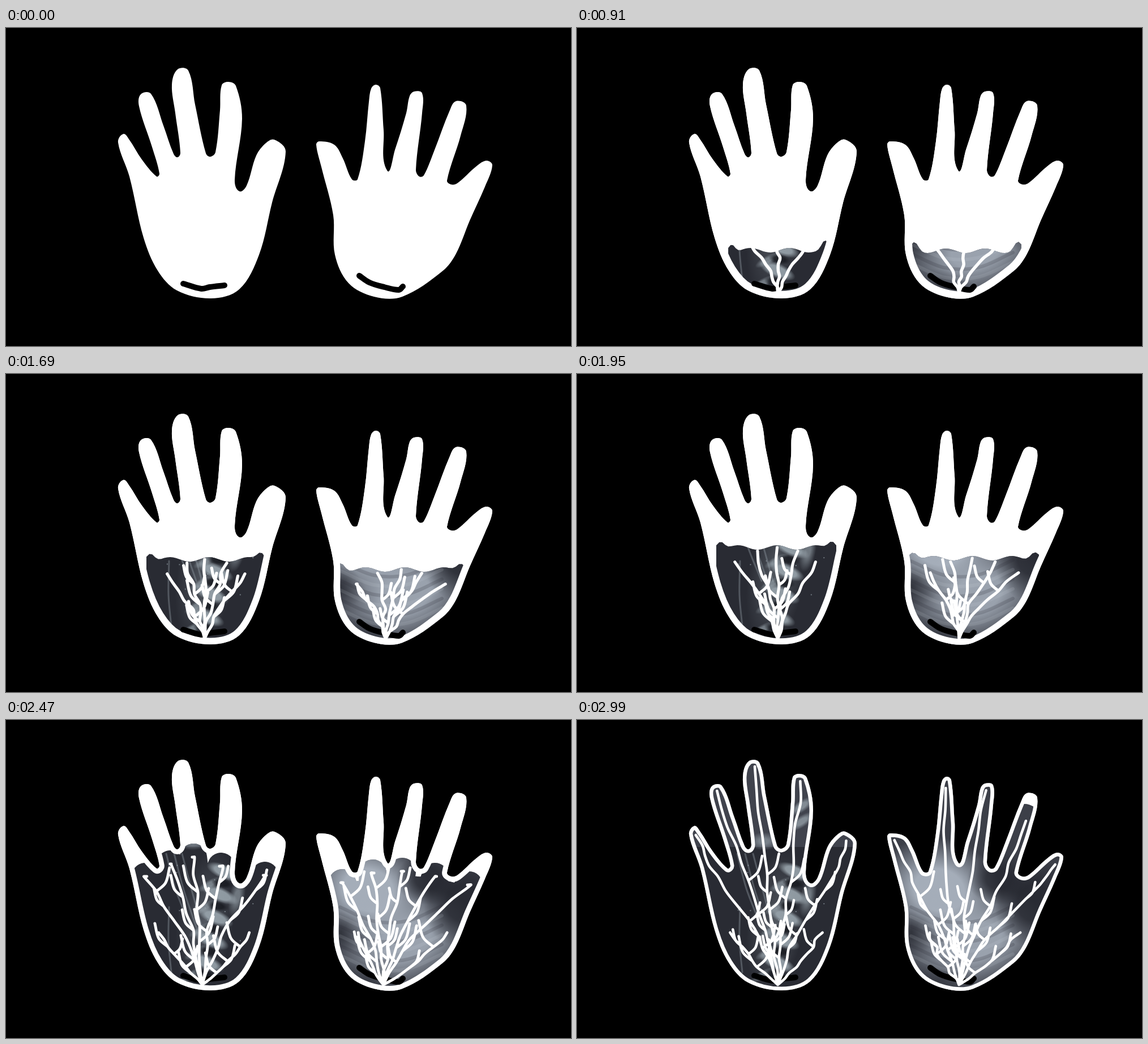
These frames come from a looping animation (998 px wide and 561 px high, 3190 ms). An HTML page with a canvas:

```html
<!DOCTYPE html>
<html lang="en">
<head>
<meta charset="utf-8">
<title>Hands</title>
<style>
html, body { margin: 0; height: 100%; overflow: hidden; background: #000; }
canvas { display: block; width: 100vw; height: 100vh; }
</style>
</head>
<body>
<canvas id="stage" width="998" height="561"></canvas>
<script>
const ctx = document.getElementById('stage').getContext('2d');
const STEP = 130, STEPS = 24, LOOP = 3190;

const mix = (a, b, u) => a + (b - a) * u;
const between = (p, q, u) => [mix(p[0], q[0], u), mix(p[1], q[1], u)];
const clamp = (v, lo = 0, hi = 1) => Math.max(lo, Math.min(hi, v));
const points = s => s.trim().split(/\s+/).map(p => p.split(',').map(Number));

function random(seed) {
  let s = seed * 7919 + 17;
  return () => (s = (s * 16807) % 2147483647) / 2147483647;
}

// Smooth curve through points, handles scaled to each segment
function curve(pts, closed = false, path = new Path2D()) {
  const n = pts.length;
  const at = i => closed ? pts[(i + n) % n] : pts[clamp(i, 0, n - 1)];
  const handle = (i, len) => {
    const [a, b] = [at(i - 1), at(i + 1)];
    const k = len / 3 / (Math.hypot(b[0] - a[0], b[1] - a[1]) || 1);
    return [(b[0] - a[0]) * k, (b[1] - a[1]) * k];
  };
  path.moveTo(...pts[0]);
  for (let i = 0; i < (closed ? n : n - 1); i++) {
    const p = at(i), q = at(i + 1), len = Math.hypot(q[0] - p[0], q[1] - p[1]);
    const h = handle(i, len), g = handle(i + 1, len);
    path.bezierCurveTo(p[0] + h[0], p[1] + h[1], q[0] - g[0], q[1] - g[1], ...q);
  }
  if (closed) path.closePath();
  return path;
}

function capsule(path, p, q, r) {
  const a = Math.atan2(q[1] - p[1], q[0] - p[0]), side = Math.PI / 2;
  path.moveTo(q[0] + r * Math.cos(a - side), q[1] + r * Math.sin(a - side));
  path.arc(...q, r, a - side, a + side);
  path.arc(...p, r, a + side, a + 3 * side);
  path.closePath();
}

function blob(x, y, rx, ry, turn, rgb, alpha, core = 0) {
  const g = ctx.createRadialGradient(0, 0, 0, 0, 0, 1);
  g.addColorStop(core, `rgba(${rgb},${alpha})`);
  g.addColorStop(1, `rgba(${rgb},0)`);
  ctx.save();
  ctx.translate(x, y);
  ctx.rotate(turn);
  ctx.scale(rx, ry);
  ctx.fillStyle = g;
  ctx.fillRect(-1, -1, 2, 2);
  ctx.restore();
}

function base(color) {
  ctx.fillStyle = color;
  ctx.fillRect(0, 0, 998, 561);
}

const PALE = '158,170,178', LIGHT = '170,179,191', DARK = '36,38,46';

function spine() {
  base('#292b33');
  ctx.fillStyle = '#40434d';
  ctx.fillRect(0, 0, 998, 224);
  blob(330, 214, 28, 16, 0, PALE, .6, .3);
  for (let i = 0; i < 2; i++) blob(397, 152 + i * 27, 26, 10, -.6, PALE, .7, .4);
  blob(352, 355, 50, 130, .15, PALE, .35);
  const rand = random(5);
  for (let i = 0; i < 5; i++) {
    const x = 386 - i * 8, y = 268 + i * 40;
    blob(x, y, 34, 13, .4, PALE, .85, .55);
    blob(x - 26, y + 22, 24, 8, -.5, PALE, .6, .4);
    blob(x - 4, y + 20, 20, 9, .2, '22,24,30', .8, .5);
  }
  blob(408, 312, 14, 38, .2, PALE, .6, .3);
  ctx.lineWidth = 3;
  ctx.strokeStyle = `rgba(${PALE},.35)`;
  for (let i = 0; i < 3; i++)
    ctx.stroke(curve([[283 + i * 14, 236], [300 + i * 14, 300], [326 + i * 10, 365]]));
  ctx.stroke(curve([[288, 330], [287, 390], [292, 445]]));
  ctx.fillStyle = `rgba(${PALE},.6)`;
  for (let i = 0; i < 16; i++) ctx.fillRect(245 + rand() * 195, 245 + rand() * 190, 2, 2);
}

function chest() {
  base('#3c3f48');
  blob(640, 300, 112, 92, .3, LIGHT, .95, .4);
  blob(705, 390, 130, 85, -.35, LIGHT, .85, .35);
  blob(588, 372, 50, 34, .4, DARK, .6);
  blob(805, 322, 66, 78, .3, DARK, .8, .4);
  blob(745, 280, 56, 46, 0, DARK, .75, .4);
  blob(640, 460, 80, 34, .2, DARK, .6);
  ctx.lineWidth = 6;
  for (let i = 0; i < 6; i++) {
    const y = 350 + i * 17;
    ctx.strokeStyle = i % 2 ? 'rgba(210,216,223,.13)' : 'rgba(40,43,52,.2)';
    ctx.stroke(curve([[590, y - 20], [650, y + 5], [710, y + 4], [770, y - 22]]));
  }
}

// level: height of the opening at each stage; fingers: knuckle, then tip
const hands = [{
  xray: spine,
  root: [348, 467],
  centre: [359, 352],
  half: 106,
  level: [475, 421, 392, 348, 306, 252, 235],
  outline: `207,187 217,196 240,232 266,262 271,257 258,210 235,138 238,117 256,116 278,172 296,222
    303,228 308,220 299,150 293,100 303,73 322,75 334,135 353,221 361,227 370,219 378,145 381,101
    393,95 406,102 417,160 404,268 412,288 425,278 442,225 459,203 474,197 494,218 470,308 447,400
    412,461 362,477 302,463 268,428 243,370 218,262 198,202`,
  mouth: '313,451 345,460 360,457 386,454',
  fingers: ['246,276 209,203', '290,254 248,125', '331,242 311,82', '380,258 396,108', '457,274 475,213']
}, {
  xray: chest,
  root: [667, 467],
  centre: [674, 701],
  half: 115,
  level: [480, 427, 393, 365, 325, 275, 255],
  outline: `553,200 580,206 595,230 611,267 621,267 634,200 641,130 645,107 653,100 661,106 667,180
    673,251 687,215 707,150 713,120 721,112 735,115 735,150 724,250 730,262 738,260 757,215 784,145
    795,129 813,137 803,190 779,269 786,276 797,274 832,243 849,234 859,242 846,280 819,340 795,398
    772,428 700,474 650,474 605,450 581,400 578,330 557,245 548,206`,
  mouth: '624,437 642,449 668,457 694,462 701,456',
  fingers: ['594,287 564,212', '648,270 653,120', '700,267 720,124', '758,276 790,178', '818,291 842,255']
}];

for (const h of hands) {
  h.outline = curve(points(h.outline), true);
  h.mouth = curve(points(h.mouth));
  h.fingers = h.fingers.map(f => {
    const [knuckle, tip] = points(f);
    return { knuckle, tip, base: between(knuckle, tip, -.5) };
  });
}

// Where the opening has got to at stage pos
function state(h, pos) {
  const k = Math.min(5, Math.floor(pos)), late = clamp(pos - 4);
  const cx = mix(...h.centre, clamp(pos / 4));
  const half = h.half - 4.4 * clamp(4 - pos, 0, 4) ** 2 + 40 * late;
  const level = mix(h.level[k], h.level[k + 1], pos - k);
  const top = x => {
    const d = Math.abs(x - cx) / half;
    const lobe = 14 * Math.exp(-(((d - .93) / .09) ** 2));
    return level + 35 * late * d * d + (1 - late) * (4 * Math.sin(x / 11 + pos) - lobe);
  };
  const ends = h.fingers.map(f => pos < 5
    ? between(f.base, f.knuckle, late)
    : between(f.knuckle, f.tip, pos - 5));
  return { cx, half, level, top, ends };
}

function opening(h, pos, s) {
  const path = new Path2D(), n = 40;
  path.moveTo(s.cx - s.half, 520);
  for (let i = 0; i <= n; i++) {
    const x = s.cx + s.half * (i / n * 2 - 1);
    path.lineTo(x, s.top(x));
  }
  path.lineTo(s.cx + s.half, 520);
  path.closePath();
  if (pos > 4) h.fingers.forEach((f, i) => capsule(path, f.base, s.ends[i], 24 + 6 * clamp(pos - 5)));
  return path;
}

// Stems fan out to the upper edge, later into the fingers; twigs sprout from them
function veins(h, pos, s, rand) {
  const path = new Path2D(), fingers = pos > 4.4;
  const root = [h.root[0] + (rand() - .5) * 16, h.root[1]];
  const grow = (way, twigEnd) => {
    const pts = [root];
    for (let i = 1; i < way.length; i++)
      for (let j = 1; j <= 4; j++) {
        const [x, y] = between(way[i - 1], way[i], j / 4);
        pts.push([x + (rand() - .5) * 7, y]);
      }
    curve(pts, false, path);
    for (let i = 2; i < twigEnd; i++) {
      const [x, y] = pts[i], side = i % 2 ? 1 : -1, long = .7 + rand() * .6;
      if (pos > 2.5 && rand() < pos / 8)
        curve([[x, y], [x + side * 14 * long, y - 13 * long], [x + side * 20 * long, y - 36 * long]], false, path);
    }
  };
  const elbow = (p, ux = .3) => [mix(root[0], p[0], ux), mix(root[1], p[1], .45)];
  if (fingers) {
    h.fingers.forEach((f, i) => grow([root, elbow(f.knuckle), f.knuckle, s.ends[i]], 8));
    for (const side of [-1, 1]) {
      const goal = [s.cx + side * 80, 375];
      grow([root, elbow(goal, .55), goal], 7);
    }
  } else {
    const n = Math.round(pos) + 1;
    for (let i = 0; i < n; i++) {
      const d = (i + .5) / n * 2 - 1, x = s.cx + d * s.half * .85;
      const goal = [x, s.level + (pos < 2.5 ? -10 : 40 * d * d)];
      grow([root, elbow(goal), goal], 7);
    }
  }
  return path;
}

function drawHand(h, pos, seed) {
  ctx.fillStyle = '#fff';
  ctx.fill(h.outline);
  ctx.save();
  ctx.clip(h.outline);
  const s = state(h, pos);
  if (pos > 0) {
    ctx.save();
    ctx.clip(opening(h, pos, s));
    h.xray();
    ctx.restore();
    ctx.strokeStyle = '#fff';
    ctx.lineWidth = 2 * mix(14, 6.5, (pos / 6) ** 2);
    ctx.stroke(h.outline);
  }
  ctx.strokeStyle = '#000';
  ctx.lineWidth = 10;
  ctx.stroke(h.mouth);
  if (pos > 0) {
    ctx.strokeStyle = '#fff';
    ctx.lineWidth = mix(6, 4.6, pos / 6);
    ctx.stroke(veins(h, pos, s, random(seed)));
  }
  ctx.restore();
}

function draw(n) {
  base('#000');
  ctx.lineCap = ctx.lineJoin = 'round';
  const pos = n < 3 ? n / 3 : 1 + (n - 3) / 4;
  hands.forEach((h, i) => drawHand(h, pos, n * 2 + i + 1));
}

const start = performance.now();
let shown = -1;
function tick() {
  const t = (performance.now() - start) % LOOP;
  const n = Math.min(STEPS - 1, Math.floor(t / STEP));
  if (n !== shown) draw(shown = n);
  requestAnimationFrame(tick);
}
tick();
</script>
</body>
</html>
```
